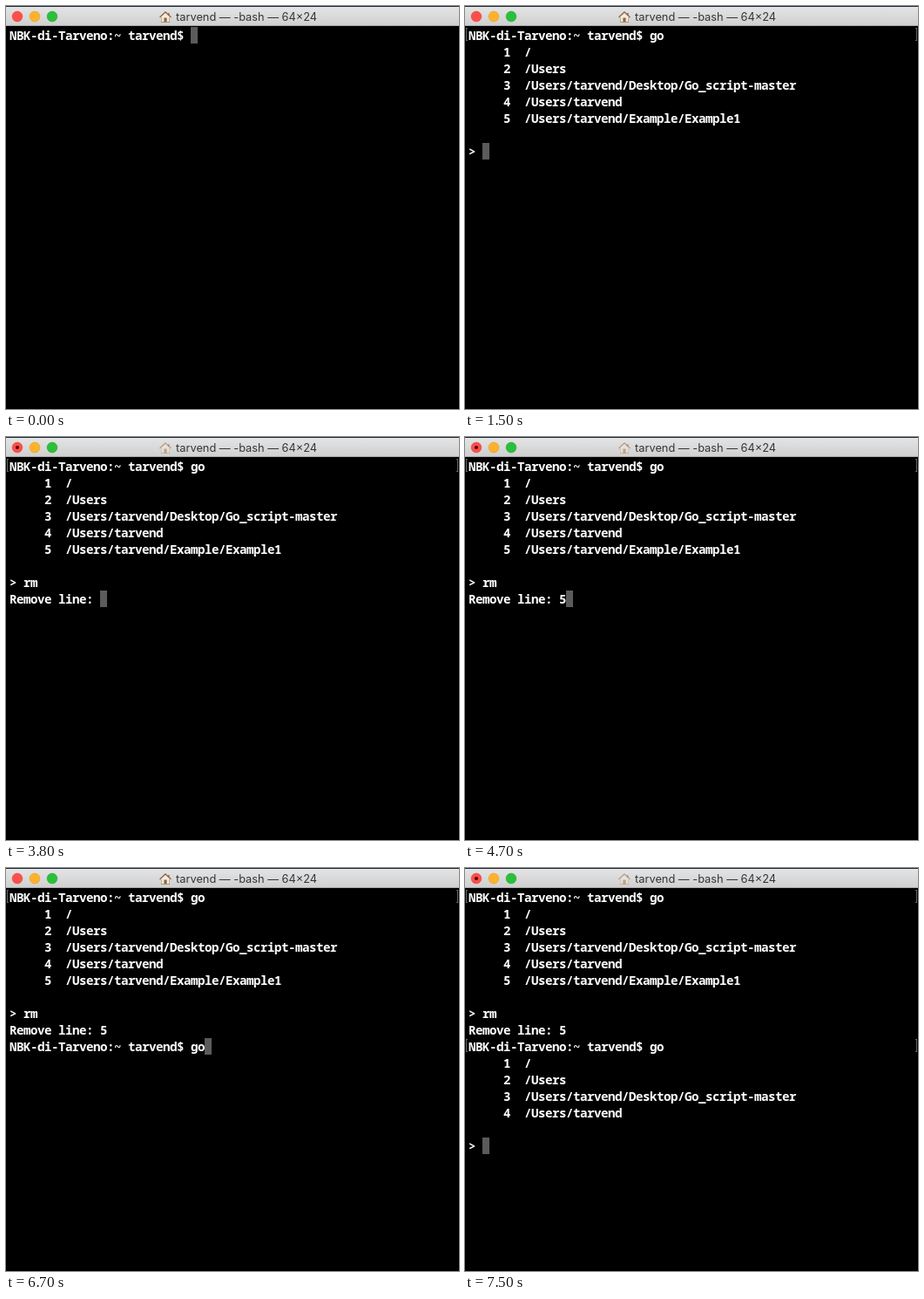
An HTML page with a canvas for the animation above (9500 ms loop, 520 by 462 pixels).

```html
<!DOCTYPE html>
<html lang="en">
<head>
<meta charset="utf-8">
<title>Terminal</title>
<style>
html, body { margin: 0; width: 100%; height: 100%; overflow: hidden; background: #000; }
canvas { display: block; }
</style>
</head>
<body>
<canvas id="stage" width="520" height="462"></canvas>
<script>
const ctx = document.getElementById('stage').getContext('2d');
const LOOP = 9500;
const CELL = 8, ROW = 19, LEFT = 4, TOP = 24;
const USER = 'tarvend';
const PROMPT = `NBK-di-Tarveno:~ ${USER}$ `;
const PATHS = ['/', '/Users', `/Users/${USER}/Desktop/Go_script-master`,
  `/Users/${USER}`, `/Users/${USER}/Example/Example1`];

const list = n => PATHS.slice(0, n).map((p, i) => `     ${i + 1}  ${p}`);
const rowY = i => TOP + i * ROW;

// Text typed at a prompt: one [time, text] pair per key press.
function typed(t, keys) {
  let text = '';
  for (const [at, s] of keys) if (t >= at) text = s;
  return text;
}

function screen(t) {
  const lines = [PROMPT + typed(t, [[700, 'g'], [800, 'go']])];
  const marks = [];
  if (t >= 1500) {
    marks.push(0);
    lines.push(...list(5), '', '> ' + typed(t, [[2800, 'r'], [2900, 'rm']]));
  }
  if (t >= 3800) lines.push('Remove line: ' + typed(t, [[4700, '5']]));
  if (t >= 5600) lines.push(PROMPT + typed(t, [[6600, 'g'], [6700, 'go']]));
  if (t >= 7200) {
    marks.push(lines.length - 1);
    lines.push(...list(4), '', '> ');
  }
  return { lines, marks };
}

// How strongly the title bar shows a running command.
function busy(t) {
  if (t >= 7500) return 1;
  if (t >= 7300) return 0.5;
  return t >= 1600 && t < 5700 ? 1 : 0;
}

function rect(x, y, w, h, color) {
  ctx.fillStyle = color;
  ctx.fillRect(x, y, w, h);
}

function poly(color, ...pts) {
  ctx.fillStyle = color;
  ctx.beginPath();
  pts.forEach(([x, y]) => ctx.lineTo(x, y));
  ctx.closePath();
  ctx.fill();
}

function disc(x, y, r, fill, edge) {
  ctx.beginPath();
  ctx.arc(x, y, r, 0, Math.PI * 2);
  ctx.fillStyle = fill;
  ctx.fill();
  if (edge) {
    ctx.strokeStyle = edge;
    ctx.lineWidth = 0.6;
    ctx.stroke();
  }
}

function house(alpha) {
  ctx.globalAlpha = alpha;
  rect(186, 8, 1.6, 3, '#93705c');
  poly('#f4ecdc', [178, 12.5], [183, 8], [188, 12.5], [188, 18.5], [178, 18.5]);
  rect(181.4, 13.5, 3.2, 5, '#94643c');
  rect(178, 18, 10, 1, '#a3947c');
  rect(178, 13, 0.7, 5, '#a3947c');
  rect(187.3, 13, 0.7, 5, '#a3947c');
  ctx.strokeStyle = '#8c6652';
  ctx.lineWidth = 1.3;
  ctx.beginPath();
  ctx.moveTo(176.5, 13);
  ctx.lineTo(183, 7);
  ctx.lineTo(189.5, 13);
  ctx.stroke();
  ctx.globalAlpha = 1;
}

function titleBar(level) {
  const shade = ctx.createLinearGradient(0, 1, 0, 22);
  shade.addColorStop(0, '#e4e4e4');
  shade.addColorStop(1, '#d0d0d0');
  rect(0, 0, 520, 1, '#1c2b38');
  rect(0, 1, 520, 21, shade);
  rect(0, 22, 520, 1, '#a8a8a8');

  disc(13, 12, 5.9, '#fc4f4a', '#e2453f');
  disc(33, 12, 5.9, '#fdb22c', '#e0a02a');
  disc(53, 12, 5.9, '#2abf3c', '#25a936');
  if (level) {
    ctx.globalAlpha = level;
    disc(13, 12, 2.1, '#5a0604');
    ctx.globalAlpha = 1;
  }
  house(1 - 0.5 * level);
  ctx.font = '12.8px Inter, Roboto, sans-serif';
  ctx.letterSpacing = '0px';
  ctx.fillStyle = '#363636';
  ctx.fillText(`${USER} — -bash — 64×24`, 195, 17);
}

// A tall bracket whose lips point right (1) or left (-1).
function bracket(x, y, dir) {
  const lip = dir > 0 ? x : x - 1;
  rect(x, y, 1, 15, '#686868');
  rect(lip, y, 2, 1, '#686868');
  rect(lip, y + 14, 2, 1, '#686868');
}

function draw(t) {
  rect(0, 0, 520, 462, '#000');
  titleBar(busy(t));

  const { lines, marks } = screen(t);
  const last = lines.length - 1;
  rect(LEFT + lines[last].length * CELL, rowY(last), CELL, ROW, '#5b5b5b');

  ctx.font = '600 14.2px "Noto Sans Mono", "DejaVu Sans Mono", monospace';
  ctx.letterSpacing = '0px';
  ctx.letterSpacing = CELL - ctx.measureText('0').width + 'px';
  ctx.fillStyle = '#fff';
  lines.forEach((line, i) => ctx.fillText(line, LEFT, rowY(i) + 15));
  for (const i of marks) {
    bracket(1, rowY(i) + 1, 1);
    bracket(518, rowY(i) + 1, -1);
  }
}

const start = performance.now();
function tick() {
  draw((performance.now() - start) % LOOP);
  requestAnimationFrame(tick);
}
tick();
</script>
</body>
</html>
```
